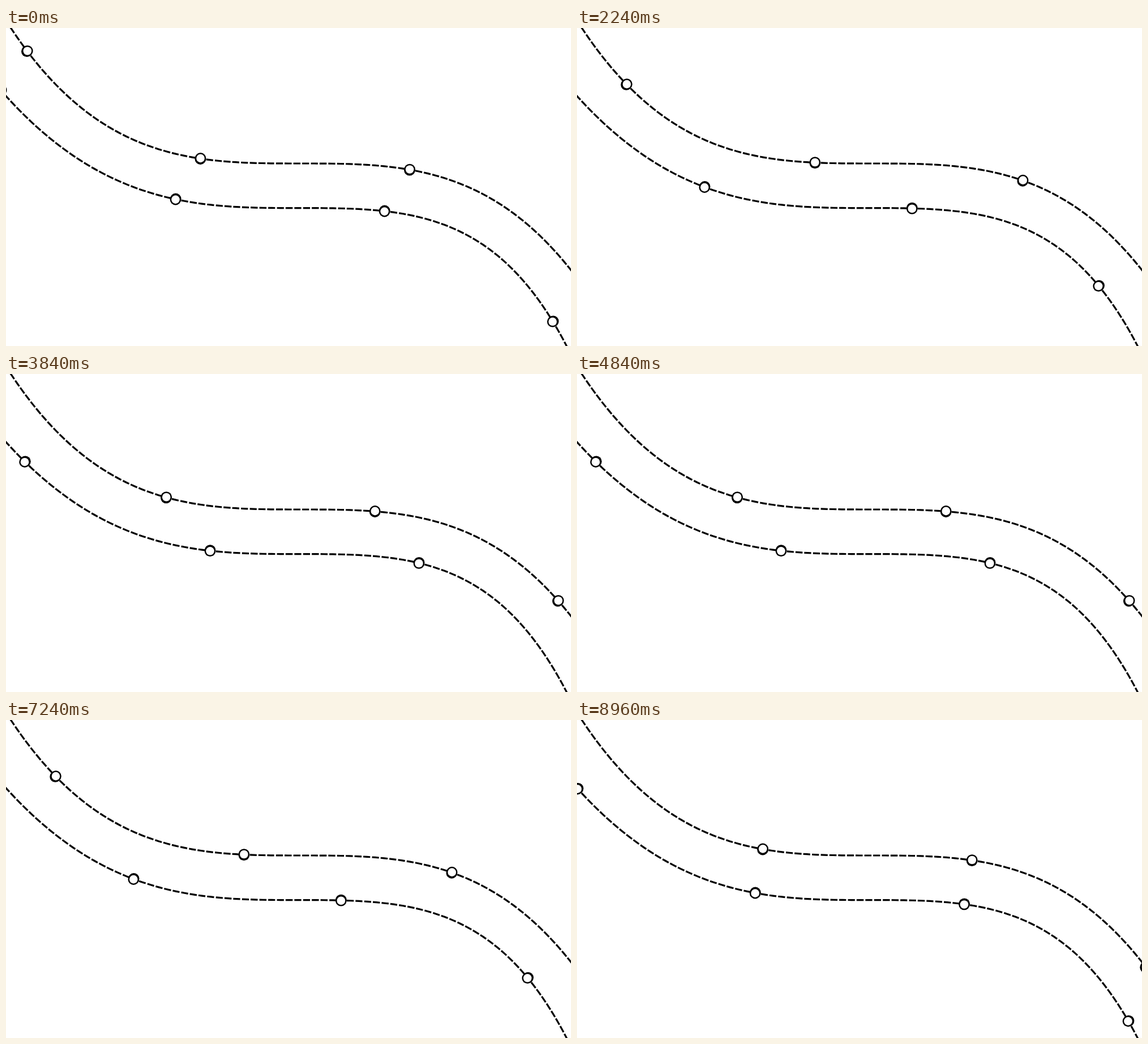
An HTML page with a canvas for the animation above (9000 ms loop, 998 by 561 pixels).

```html
<!DOCTYPE html>
<html lang="en">
<head>
<meta charset="utf-8">
<title>Moving stitches</title>
<style>
  html, body { margin: 0; width: 100%; height: 100%; overflow: hidden; background: #fff; }
  canvas { display: block; width: 998px; height: 561px; }
</style>
</head>
<body>
<canvas id="stage"></canvas>
<script>
const WIDTH = 998, HEIGHT = 561;
const PERIOD = 15.43;    // length of one dash and gap; rings advance by one per tick
const SPACING = 24;      // dash periods between neighbouring rings
const HALF_DASH = 0.4;   // in dash periods
const DASH_SHIFT = 0.06; // dashes sit slightly to the right of the ring positions
const RISE = 198;        // height of a curve at u = 1
const SAMPLES = 4;       // arc length samples per pixel

const ratio = window.devicePixelRatio || 1;
const canvas = document.getElementById('stage');
canvas.width = WIDTH * ratio;
canvas.height = HEIGHT * ratio;
const ctx = canvas.getContext('2d');

// An S-curve around its inflection point. Each side has a reach and a bend;
// `middle` is the inflection's distance from the first ring, in dash periods.
const upper = makeTrack({
  x: 520.6, y: 239, left: [515, -32], right: [517, -32], middle: 35.5, direction: 1
});
const lower = makeTrack({
  x: 514.6, y: 317.6, left: [494, 21], right: [534, -84], middle: 38, direction: -1
});

function makeTrack({ x, y, left, right, middle, direction }) {
  const point = u => {
    const [reach, bend] = u < 0 ? left : right;
    return [x + u * (reach + bend * Math.abs(u)), y + RISE * u ** 3];
  };

  // Walk away from the inflection in equal steps of arc length.
  const walk = side => {
    const stops = [0], du = side * 1e-4;
    for (let i = 0, u = 0; i < 660 * SAMPLES; i++) {
      const [x0, y0] = point(u), [x1, y1] = point(u + du);
      u += du / Math.hypot(x1 - x0, y1 - y0) / SAMPLES;
      stops.push(u);
    }
    return stops;
  };
  const before = walk(-1), after = walk(1);

  const at = s => {
    const distance = (s - middle) * PERIOD;
    const stops = distance < 0 ? before : after;
    return point(stops[Math.round(Math.abs(distance) * SAMPLES)]);
  };
  return { at, direction };
}

function drawDashes({ at }) {
  ctx.lineWidth = 3.2;
  ctx.beginPath();
  for (let k = -4; k <= 76; k++) {
    const s = k + DASH_SHIFT;
    ctx.moveTo(...at(s - HALF_DASH));
    ctx.lineTo(...at(s));
    ctx.lineTo(...at(s + HALF_DASH));
  }
  ctx.stroke();
}

function disc(x, y, radius, color) {
  ctx.fillStyle = color;
  ctx.beginPath();
  ctx.arc(x, y, radius, 0, 2 * Math.PI);
  ctx.fill();
}

// The heavy side of a ring lies to the right of its travel direction.
function drawRing({ at, direction }, s) {
  const [x, y] = at(s);
  const [x0, y0] = at(s - 0.5), [x1, y1] = at(s + 0.5);
  const length = Math.hypot(x1 - x0, y1 - y0) * direction;
  const nx = (y0 - y1) / length, ny = (x1 - x0) / length;
  disc(x + nx * 0.8, y + ny * 0.8, 9.8, '#000');
  disc(x - nx * 0.5, y - ny * 0.5, 9.8, '#000');
  disc(x - nx * 0.5, y - ny * 0.5, 7.3, '#fff');
}

function drawTrack(track, step) {
  drawDashes(track);
  for (let k = 0; k <= 4; k++) {
    const s = k * SPACING + track.direction * step;
    if (s > -4 && s < 77) drawRing(track, s);
  }
}

function render(now) {
  // 25 ticks per second; the first pose of each second holds for two ticks.
  const step = Math.max(0, Math.floor((now % 1000) / 40) - 1);
  ctx.setTransform(ratio, 0, 0, ratio, 0, 0);
  ctx.fillStyle = '#fff';
  ctx.fillRect(0, 0, WIDTH, HEIGHT);
  ctx.strokeStyle = '#000';
  drawTrack(upper, step);
  drawTrack(lower, step);
}

let startTime;
function loop(now) {
  startTime ??= now;
  render(Math.max(0, now - startTime));
  requestAnimationFrame(loop);
}
render(0);
requestAnimationFrame(loop);
</script>
</body>
</html>
```
